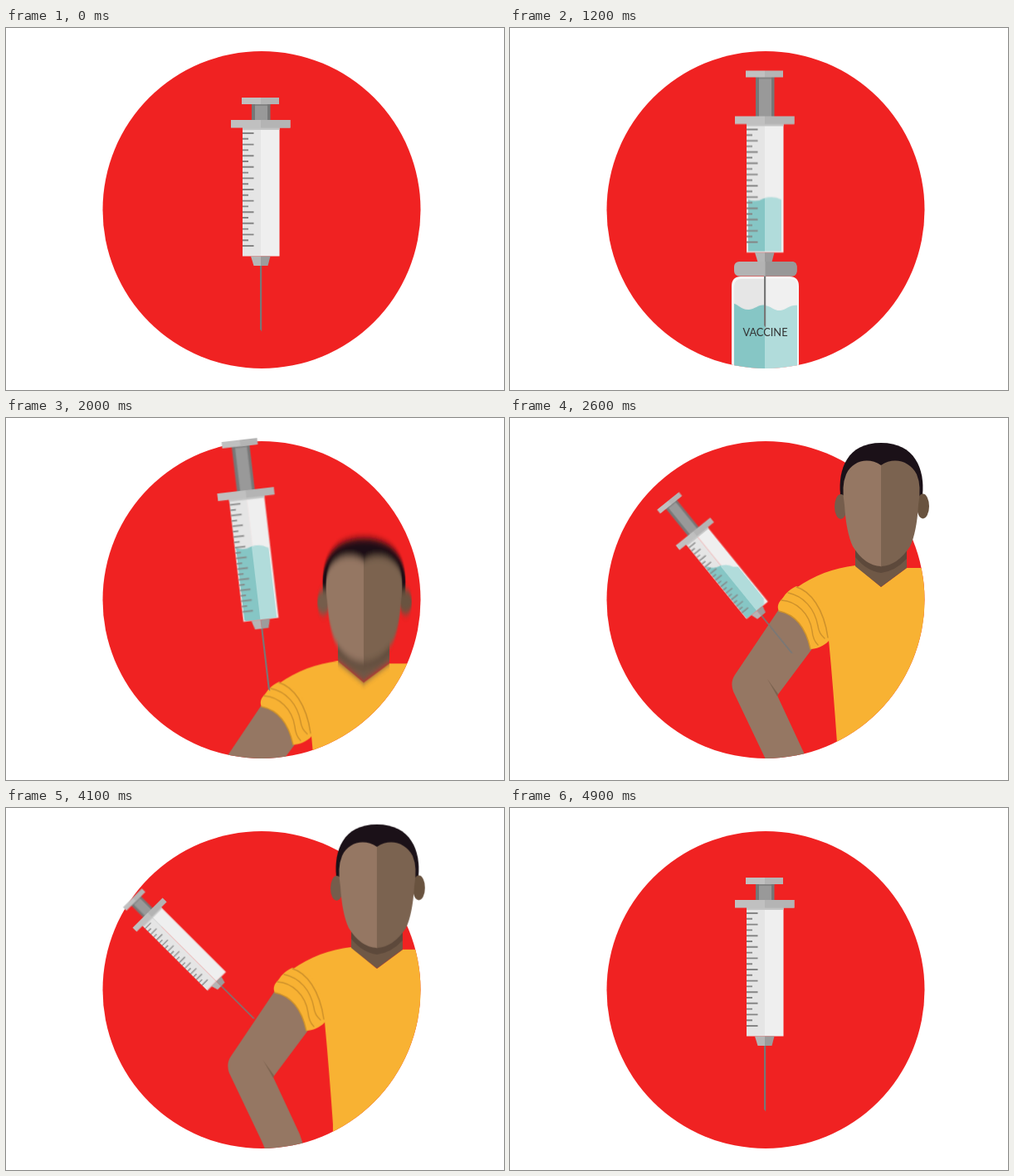
These frames come from a looping animation (600x437 px, 5 s). An HTML page:

```html
<!DOCTYPE html>
<html lang="en">
<head>
<meta charset="utf-8">
<title>Vaccination</title>
<style>
  html, body { margin: 0; width: 100%; height: 100%; overflow: hidden; background: #fff; }
  svg { display: block; width: 100%; height: 100%; }
  text { font: 12.8px Lato, "Open Sans", sans-serif; fill: #333; }

  .vial, .drain, .syringe, .plunger, .fill, .tilt, .person, .body, .head {
    animation: 5s linear infinite;
  }
  .vial { animation-name: vial; }
  .drain { animation-name: drain; }
  .syringe { animation-name: syringe; transform-origin: 307px 225px; }
  .plunger { animation-name: plunger; }
  .fill { animation-name: fill; }
  .tilt { animation-name: tilt; transform-origin: 307px 182px; }
  .person { animation-name: person; }
  .body { animation-name: body-blur; animation-timing-function: step-end; }
  .head { animation-name: head-blur; animation-timing-function: step-end; }

  @keyframes vial {
    0%, 2% { transform: translateY(132px); animation-timing-function: cubic-bezier(.2, .6, .3, 1); }
    12% { transform: translateY(0); }
    26% { transform: translateY(0); animation-timing-function: ease-in; }
    32% { transform: translateY(33px); }
    38%, 100% { transform: translateY(132px); }
  }
  @keyframes drain {
    0%, 13% { transform: translateY(0); }
    28%, 100% { transform: translateY(23px); }
  }
  @keyframes syringe {
    0%, 10% { transform: translate(0, 0) rotate(0deg) scale(1); }
    14% { transform: translate(0, -3px) rotate(0deg) scale(1); }
    27% { transform: translate(0, -5px) rotate(0deg) scale(1); animation-timing-function: ease-in; }
    32% { transform: translate(0, -19px) rotate(0deg) scale(1); animation-timing-function: ease-out; }
    36% { transform: translate(0, -31px) rotate(0deg) scale(1); animation-timing-function: ease-in-out; }
    50%, 53% { transform: translate(-33px, -22px) rotate(-39deg) scale(.745); animation-timing-function: ease-in-out; }
    65%, 79% { transform: translate(-62px, -25px) rotate(-45deg) scale(.712); animation-timing-function: ease-in-out; }
    84% { transform: translate(-87px, -49px) rotate(-45deg) scale(.712); animation-timing-function: ease-in; }
    90% { transform: translate(-75px, -11.5px) rotate(-24.9deg) scale(.865); animation-timing-function: ease-out; }
    96%, 100% { transform: translate(0, 0) rotate(0deg) scale(1); }
  }
  @keyframes plunger {
    0%, 12% { transform: translateY(0); }
    14% { transform: translateY(-5px); }
    24% { transform: translateY(-28px); }
    28%, 70% { transform: translateY(-37px); animation-timing-function: ease-in-out; }
    80%, 90% { transform: translateY(-9px); }
    96%, 100% { transform: translateY(0); }
  }
  @keyframes fill {
    0%, 14% { transform: translateY(97px); }
    28%, 70% { transform: translateY(0); animation-timing-function: ease-in-out; }
    80%, 100% { transform: translateY(118px); }
  }
  @keyframes tilt {
    0%, 36% { transform: rotate(0deg); animation-timing-function: ease-in-out; }
    50%, 53% { transform: rotate(39deg); animation-timing-function: ease-in-out; }
    65%, 84% { transform: rotate(45deg); }
    96%, 100% { transform: rotate(0deg); }
  }
  @keyframes person {
    0%, 37% { transform: translate(-55px, 395px); animation-timing-function: cubic-bezier(.3, .3, .4, 1); }
    44% { transform: translate(2.5px, -18px); animation-timing-function: ease-in-out; }
    49%, 77% { transform: translate(0, 0); animation-timing-function: ease-in-out; }
    81.5% { transform: translate(0, -12px); animation-timing-function: ease-in; }
    84% { transform: translate(-2px, 15px); animation-timing-function: cubic-bezier(.45, .3, .8, .8); }
    90% { transform: translate(-32px, 225px); }
    95%, 100% { transform: translate(-58px, 410px); }
  }
  @keyframes body-blur {
    0% { filter: none; }
    30% { filter: url(#rise); }
    35% { filter: none; }
    86% { filter: url(#swing); }
    94%, 100% { filter: none; }
  }
  @keyframes head-blur {
    0% { filter: none; }
    37% { filter: url(#drop); }
    42% { filter: none; }
    85% { filter: url(#drop); }
    96%, 100% { filter: none; }
  }
</style>
</head>
<body>
<svg viewBox="0 0 600 437">
  <defs>
    <clipPath id="disc"><circle cx="308" cy="219.5" r="191.5"/></clipPath>
    <clipPath id="discTop">
      <circle cx="308" cy="219.5" r="191.5"/>
      <rect width="600" height="181"/>
    </clipPath>
    <clipPath id="tubeLeft"><rect x="287" y="122" width="20" height="152"/></clipPath>
    <clipPath id="tubeRight"><rect x="307" y="122" width="20" height="152"/></clipPath>
    <clipPath id="glassLeft"><rect x="270" y="303" width="37.5" height="300"/></clipPath>
    <clipPath id="glassRight"><rect x="307.5" y="303" width="38.5" height="300"/></clipPath>
    <filter id="rise"><feGaussianBlur stdDeviation="0 1.5"/></filter>
    <filter id="swing"><feGaussianBlur stdDeviation="1.4 .4"/></filter>
    <filter id="drop"><feGaussianBlur stdDeviation="0 4.5"/></filter>
  </defs>

  <circle cx="308" cy="219.5" r="191.5" fill="#f02222"/>

  <!-- vial glass and contents -->
  <g clip-path="url(#disc)">
    <g class="vial">
      <path d="M267 600V312Q267 300 278 300H337Q348 300 348 312V600Z" fill="#f6f6f6"/>
      <path d="M270 600V312Q270 303 279 303H307.5V600Z" fill="#e6e6e6"/>
      <path d="M307.5 600V303H337Q346 303 346 312V600Z" fill="#f0f0f0"/>
      <g clip-path="url(#glassLeft)">
        <path class="drain" fill="#86c6c5" d="M268 315C276 317 279 324 288 323S299 316 308 318V600H268Z"/>
      </g>
      <g clip-path="url(#glassRight)">
        <path class="drain" fill="#b1dcdb" d="M307 318C315 319 319 325 326 324S338 316 348 318V600H307Z"/>
      </g>
    </g>
  </g>

  <!-- arm and shirt -->
  <g clip-path="url(#disc)">
    <g class="person">
      <path fill="#957763" d="M326 228L271 310Q265 319 269 330L308 412L320 440H366L354 404L322 335L366 276L350 235Z"/>
      <path fill="#7b6350" d="M310 315L323 333L322 336Z"/>
      <path fill="#f8b233" d="M416 178C390 181 366 190 345 205L366 240L384 268C388 310 391 350 394 392V450H530V181H478L447 204Z"/>
      <path fill="#f8b233" d="M345 203C334 208 331 214 328 218C322 224 322 229 324 233C343 237 356 251 362 279C369 279 379 275 384 269C386 257 380 228 368 214Z"/>
      <g fill="none" stroke="#cf922b" stroke-width="1.5" stroke-linecap="round">
        <path d="M345 204C362 209 378 230 383 265"/>
        <path d="M335 211C354 215 367 230 371 251Q372 260 379 266"/>
        <path d="M327 220C345 221 361 236 364 257Q365 268 371 274"/>
        <path d="M324 233C343 237 356 251 362 279"/>
      </g>
    </g>
  </g>

  <!-- head -->
  <g clip-path="url(#discTop)">
    <g class="person">
      <g class="head">
        <path fill="#6f5846" d="M416 145H478V181L447 204L416 179Z"/>
        <path fill="#5d493b" d="M416 152L447 180L478 152V170Q464 185 447 187Q430 185 416 168Z"/>
        <path fill="#1b1118" d="M398 93C395 62 406 30 447 30S500 62 497 93L490 100H404Z"/>
        <ellipse cx="398.5" cy="107" rx="7.5" ry="15" fill="#755d4c"/>
        <ellipse cx="497.5" cy="106.500" rx="7.5" ry="15" fill="#69533f"/>
        <path fill="#957763" d="M447 57C432 47 413 51 405 68Q399 82 403 105Q405 138 413 155Q427 178 447 179Z"/>
        <path fill="#7b6350" d="M447 57C462 47 481 51 490 68Q496 82 492 105Q490 138 482 155Q467 178 447 179Z"/>
      </g>
    </g>
  </g>

  <g class="syringe">
    <path fill="#777" d="M306 286H308.200V366.500L306 363.500Z"/>
    <g class="body">
      <g class="plunger">
        <rect x="296" y="91" width="22.500" height="62" fill="#777"/>
        <rect x="300" y="91" width="15" height="62" fill="#999"/>
        <rect x="296" y="91" width="22.500" height="3" fill="#777" opacity=".6"/>
        <rect x="284" y="84" width="45" height="8" fill="#c0c0c0"/>
        <rect x="307" y="84" width="22" height="8" fill="#b4b4b4"/>
      </g>
      <rect x="285" y="120" width="22" height="155.500" fill="#e5e5e5"/>
      <rect x="307" y="120" width="22.500" height="155.500" fill="#efefef"/>
      <g clip-path="url(#tubeLeft)">
        <g class="fill">
          <path class="tilt" fill="#86c6c5" d="M237 184H287Q297 188 307 182H377V400H237Z"/>
        </g>
      </g>
      <g clip-path="url(#tubeRight)">
        <g class="fill">
          <path class="tilt" fill="#b1dcdb" d="M237 184H287L307 182Q318 179 327 184H377V400H237Z"/>
        </g>
      </g>
      <rect x="285" y="120" width="44.500" height="3" fill="#c4c4c4"/>
      <g id="ticks" fill="none" stroke="#858585" stroke-width="1.9"></g>
      <rect x="271" y="111" width="71.500" height="9.500" fill="#c0c0c0"/>
      <rect x="307" y="111" width="35.500" height="9.500" fill="#b4b4b4"/>
      <path fill="#b5b5b5" d="M295 275.500H307V287H298.500Z"/>
      <path fill="#9c9c9c" d="M307 275.500H318.500L315.500 287H307Z"/>
    </g>
  </g>

  <!-- vial cap and label -->
  <g clip-path="url(#disc)">
    <g class="vial">
      <rect x="270" y="282" width="75.500" height="17.500" rx="6" fill="#b3b3b3"/>
      <path fill="#989898" d="M307.500 282H339.500Q345.500 282 345.500 288V293.500Q345.500 299.500 339.500 299.500H307.500Z"/>
      <text x="307.500" y="371.500" text-anchor="middle">VACCINE</text>
    </g>
  </g>
</svg>
<script>
  // Scale marks alternate long and short down the barrel.
  const marks = Array.from({ length: 21 }, (_, i) =>
    `M285 ${(127 + i * 6.8).toFixed(1)}h${i % 2 ? 7 : 13.5}`);
  document.getElementById("ticks").innerHTML = `<path d="${marks.join("")}"/>`;
</script>
</body>
</html>
```
